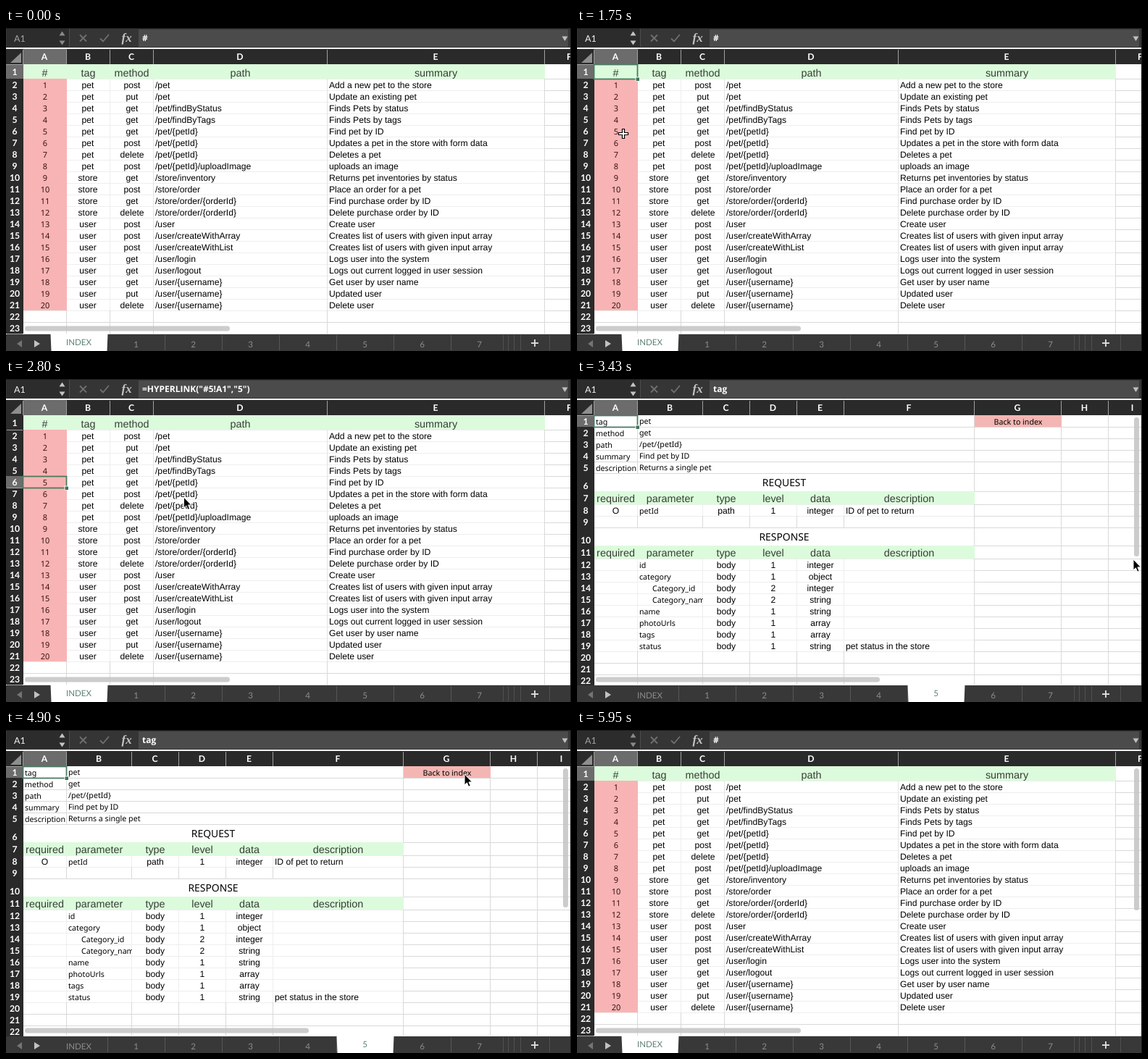
Write an HTML page that moves like this. It is 780x446 px and loops after 6.02 s.

```html
<!DOCTYPE html>
<html lang="en">
<head>
<meta charset="utf-8">
<title>Spreadsheet</title>
<style>
html, body { margin: 0; width: 100%; height: 100%; overflow: hidden; background: #fff; }
svg { display: block; }
text { text-rendering: geometricPrecision; white-space: pre; }
.cell { font: 12.15px "Liberation Sans", Arial, sans-serif; fill: #000; }
.head { font: 14.4px "Liberation Sans", Arial, sans-serif; fill: #354035; }
.note { font: 10.65px "Noto Sans", "Open Sans", sans-serif; fill: #000; }
.big { font: 13.9px "Noto Sans", "Open Sans", sans-serif; fill: #000; }
.idx { font: 11px "Noto Sans", "Open Sans", sans-serif; fill: #3c1212; }
.label { font: bold 12.2px Lato, sans-serif; fill: #fff; }
.formula { font: bold 12px "Open Sans", "Noto Sans", sans-serif; fill: #fff; }
.name { font: 12.5px Lato, sans-serif; fill: #f2f2f2; }
.tab { font: 11.6px Lato, sans-serif; fill: #8c8c8c; }
.tab.on { fill: #5f8272; }
.fresh .tab.on { fill: #a2aaa6; }
.fresh .tab.prev { fill: #5d9275; font-weight: bold; }
.fx { font: italic bold 17px "Liberation Serif", serif; fill: #c4c4c4; }
.step { fill: #c4c4c4; }
.idle .name { fill: #a4a4a4; }
.idle .step { fill: #8a8a8a; }
</style>
</head>
<body>
<svg id="stage" width="780" height="446" viewBox="0 0 780 446"></svg>
<script>
const GRID = '#d9d9d9', SOFT = '#eeeeee', GREEN = '#dcfbdc', PINK = '#f8b4b4', DARK = '#2a2a2a', RULE = '#a0a0a0';
const SIZE = { cell: 12.15, head: 14.4, note: 10.65, big: 13.9, idx: 11, label: 12.2, formula: 12, name: 12.5, tab: 11.6 };

const rect = (x, y, w, h, fill, more = '') =>
  `<rect x="${x}" y="${y}" width="${w}" height="${h}" fill="${fill}" ${more}/>`;
const vline = (x, y1, y2, c) => rect(x, y1, 1, y2 - y1, c);
const hline = (y, x1, x2, c) => rect(x1, y, x2 - x1, 1, c);
const shape = (d, fill, more = '') => `<path d="${d}" fill="${fill}" ${more}/>`;
const text = (x, mid, str, cls, anchor = 'start', more = '') =>
  `<text x="${x}" y="${mid + SIZE[cls.split(' ')[0]] * 0.35}" class="${cls}" text-anchor="${anchor}" ${more}>${str}</text>`;
const center = (a, b, mid, str, cls) => text((a + b) / 2, mid, str, cls, 'middle');
const group = (id, body) => `<g id="${id}">${body}</g>`;

// Row boundaries from a list of heights
const stack = (start, heights) => heights.reduce((a, h) => [...a, a[a.length - 1] + h], [start]);

function colHead(cols, i) {
  const a = cols[i], b = cols[i + 1];
  return rect(a + 1, 29, b - a, 21, i ? DARK : '#6c6c6c') + vline(b, 30, 50, RULE) +
    center(a, b, 40, 'ABCDEFGHI'[i], 'label');
}
function rowHead(rows, i, on, drop = 0) {
  const y = rows[i], h = rows[i + 1] - y;
  return rect(0, y, 24, h, on ? '#6c6c6c' : DARK) + hline(y + h, 1, 23, RULE) +
    text(12, y + 1 + h / 2 + drop, i + 1, 'label', 'middle');
}
const corner = rect(0, 29, 24, 21, DARK) + shape('M21 34V48H6Z', '#8e8e8e') + vline(23, 30, 50, RULE) + hline(50, 0, 23, RULE);

function tabs(active, prev) {
  let s = rect(0, 423, 780, 23, '#383838') +
    shape('M22 431V441L15 436Z', '#747474') + shape('M39 431V441L47 436Z', '#c2c2c2');
  for (let i = 0; i < 8; i++) {
    const x = 61.5 + 79 * i, on = i === active;
    if (on) s += shape(`M${x} 422H${x + 79}L${x + 78} 446H${x + 1}Z`, '#fff');
    else s += vline(Math.round(x + 78), 424, 445, '#575757');
    s += text(x + 39, on ? 434 : 436.5, i || 'INDEX', `tab${on ? ' on' : i === prev ? ' prev' : ''}`, 'middle');
  }
  for (const x of [686, 693, 701, 710, 750]) s += vline(x, 424, 445, '#505050');
  return s + rect(725, 434.2, 10, 1.8, '#e4e4e4') + rect(729.1, 430, 1.8, 10, '#e4e4e4');
}
const scrollbar = (x, y, w, h, id) =>
  rect(x, y, w, h, '#c4c4c4', `rx="3.5" opacity=".85" ${id ? `id="${id}"` : ''}`);

const selection = (y, h) =>
  rect(23.5, y, 60, h, 'none', 'stroke="#4b7a61" stroke-width="1.8"') +
  rect(80.5, y + h - 3, 6, 6, '#fff') + rect(81.5, y + h - 2, 4.5, 4.5, '#3f7558');

function indexSheet() {
  const cols = [23, 83, 143, 203, 443, 743, 812];
  const rows = stack(50, [20, ...Array(22).fill(16)]);
  const data = `pet,post,/pet,Add a new pet to the store
pet,put,/pet,Update an existing pet
pet,get,/pet/findByStatus,Finds Pets by status
pet,get,/pet/findByTags,Finds Pets by tags
pet,get,/pet/{petId},Find pet by ID
pet,post,/pet/{petId},Updates a pet in the store with form data
pet,delete,/pet/{petId},Deletes a pet
pet,post,/pet/{petId}/uploadImage,uploads an image
store,get,/store/inventory,Returns pet inventories by status
store,post,/store/order,Place an order for a pet
store,get,/store/order/{orderId},Find purchase order by ID
store,delete,/store/order/{orderId},Delete purchase order by ID
user,post,/user,Create user
user,post,/user/createWithArray,Creates list of users with given input array
user,post,/user/createWithList,Creates list of users with given input array
user,get,/user/login,Logs user into the system
user,get,/user/logout,Logs out current logged in user session
user,get,/user/{username},Get user by user name
user,put,/user/{username},Updated user
user,delete,/user/{username},Delete user`.split('\n').map(r => r.split(','));

  let s = rect(0, 29, 780, 394, '#fff');
  for (const y of rows.slice(1)) s += hline(y, 24, 743, y > 391 ? GRID : SOFT) + hline(y, 743, 780, GRID);
  for (const x of cols.slice(1, 6)) {
    s += vline(x, 70, 390, x < 203 ? SOFT : '#e4e4e4') + vline(x, 390, 422, GRID);
  }
  s += vline(743, 50, 390, GRID) + rect(24, 50, 720, 20, GREEN) + rect(24, 70, 60, 320, PINK);
  ['#', 'tag', 'method', 'path', 'summary'].forEach((h, i) => s += center(cols[i], cols[i + 1] + 1, 62, h, 'head'));
  data.forEach(([tag, method, path, sum], i) => {
    const y = 79 + 16 * i;
    s += center(24, 84, y, i + 1, 'idx') + center(83, 143, y, tag, 'cell') + center(144, 204, y, method, 'cell') +
      text(206, y, path, 'cell') + text(446, y, sum, 'cell');
  });
  for (let i = 0; i < 6; i++) s += colHead(cols, i);
  for (let i = 0; i < 23; i++) s += rowHead(rows, i, i === 0);
  const pick = group('linkPick', rowHead(rows, 0, false) + rowHead(rows, 5, true) + selection(134.5, 16));
  return group('index', s + corner + group('homePick', selection(50.5, 20)) + pick +
    scrollbar(26, 411.5, 283, 7) + scrollbar(769, 53, 7, 196, 'vbar') + tabs(0, 5));
}

function detailSheet() {
  const cols = [23, 83, 173, 238, 303, 368, 548, 668, 733, 800];
  const rows = stack(50, [16, 16, 16, 16, 16, 25, 18, 16, 16, 25, 18, ...Array(11).fill(16)]);
  const heads = ['required', 'parameter', 'type', 'level', 'data', 'description'];
  const info = ['tag', 'pet', 'method', 'get', 'path', '/pet/{petId}', 'summary', 'Find pet by ID', 'description', 'Returns a single pet'];
  const fields = ['id,1,integer', 'category,1,object', 'Category_id,2,integer', 'Category_name,2,string',
    'name,1,string', 'photoUrls,1,array', 'tags,1,array', 'status,1,string'].map(r => r.split(','));
  const table = (y1, y2) => cols.slice(1, 6).map(x => vline(x, y1, y2, SOFT)).join('');

  let s = rect(0, 29, 780, 394, '#fff');
  rows.slice(1).forEach((y, i) => {
    const inner = i === 6 || i === 7 || (i > 9 && i < 19);
    s += hline(y, 24, 548, inner ? SOFT : GRID) + hline(y, 548, 780, GRID);
  });
  for (const x of cols.slice(1, 6)) s += vline(x, 189, 205, GRID) + vline(x, 376, 422, GRID);
  for (const x of cols.slice(6, 9)) s += vline(x, 50, 422, GRID);
  s += vline(83, 50, 130, GRID) + table(173, 189) + table(248, 376);

  info.forEach((v, i) => {
    const y = 59 + 16 * (i >> 1);
    s += i % 2 ? text(86, y - 0.7, v, 'note') : text(26, y + 0.3, v, 'note');
  });
  s += center(23, 549, 143, 'REQUEST', 'big') + center(23, 549, 218, 'RESPONSE', 'big');
  for (const [y, mid] of [[155, 165], [230, 240]]) {
    s += rect(24, y, 525, 18, GREEN);
    heads.forEach((h, i) => s += center(cols[i], cols[i + 1] + 1, mid, h, 'head'));
  }
  const values = (y, type, level, kind) => center(173, 239, y, type, 'cell') +
    center(238, 304, y, level, 'cell') + center(303, 369, y, kind, 'cell');
  s += center(23, 84, 182, 'O', 'cell') + text(86, 182, 'petId', 'note') +
    values(182, 'path', 1, 'integer') + text(371, 182, 'ID of pet to return', 'cell');
  fields.forEach(([name, level, kind], i) => {
    const y = 257 + 16 * i;
    s += text(level > 1 ? 104 : 86, y, name, 'note') + rect(174, y - 7, 63, 14, '#fff') + values(y, 'body', level, kind);
  });
  s += text(371, 369, 'pet status in the store', 'cell') +
    rect(549, 50, 120, 16, '#f4b6b3') + center(549, 669, 59, 'Back to index', 'note');

  for (let i = 0; i < 9; i++) s += colHead(cols, i);
  for (let i = 0; i < 22; i++) s += rowHead(rows, i, i === 0, i === 5 || i === 9 ? 4.5 : 0);
  return group('detail', s + corner + selection(50.5, 16) +
    scrollbar(26, 411.5, 392, 7) + scrollbar(769, 53, 7, 192) + tabs(5, 0));
}

function toolbar() {
  const steps = '<path class="step" d="M73.5 10.5H81.5L77.5 4.5ZM73.5 17.5H81.5L77.5 23.5Z"/>';
  return group('bar', rect(0, 0, 780, 27, '#353535') + rect(1, 1, 86, 25, '#2c2c2c') + rect(183, 2, 593, 24, '#4b4b4b') +
    hline(0, 0, 780, '#1c1c1c') + vline(87, 1, 26, '#4c4c4c') +
    rect(0, 27, 780, 2, '#f0f0f0') +
    text(11, 14.5, 'A1', 'name') + steps +
    shape('M102 9.5L111 18.5M111 9.5L102 18.5', 'none', 'stroke="#707070" stroke-width="1.8"') +
    shape('M130 14.5L134 18.5L142 9', 'none', 'stroke="#707070" stroke-width="1.8"') +
    '<text x="159.5" y="19" class="fx">fx</text>' +
    text(188, 14, '#', 'formula', 'start', 'id="formula"') +
    shape('M767.5 11.5H775.5L771.5 18Z', '#c0c0c0'));
}

const pointers =
  group('arrow', shape('M0 0V15L3.4 11.8L5.7 17.2L8.2 16.1L5.9 10.9H10.4Z', '#000', 'stroke="#fff"')) +
  group('cross', shape('M-1.5 -6.5H1.5V-1.5H6.5V1.5H1.5V6.5H-1.5V1.5H-6.5V-1.5H-1.5Z', '#fff', 'stroke="#000" stroke-width="1.2"'));

const $ = id => document.getElementById(id);
$('stage').innerHTML = indexSheet() + detailSheet() + toolbar() + vline(779, 0, 446, '#1c1c1c') + pointers;

const LOOP = 6020, STEP = 70;
const FOCUS = 490, PRESS = 2590, OPEN = 2870, BACK = 4970, BLUR = 5810;

// Pointer stops: time, x, y
const path = [
  [420, -12, 290], [980, 90, 245], [1750, 64, 146], [2240, 55, 140], [2380, 53, 138], [2730, 53, 138],
  [2940, 795, 235], [3360, 795, 255], [3430, 768, 249], [3990, 768, 161], [4340, 644, 68], [4620, 633, 61],
  [5040, 633, 61], [5320, 795, 120]
];
function pointerAt(t) {
  const i = path.findIndex(p => p[0] > t);
  if (i < 1) return [-50, -50];
  const [t0, x0, y0] = path[i - 1], [t1, x1, y1] = path[i];
  const u = (t - t0) / (t1 - t0), k = u * u * (3 - 2 * u);
  return [x0 + (x1 - x0) * k, y0 + (y1 - y0) * k];
}
const show = (id, on) => $(id).style.display = on ? '' : 'none';

function render(t) {
  const detail = t >= OPEN && t < BACK, active = t >= FOCUS && t < BLUR;
  const link = t >= PRESS && t < OPEN;
  show('index', !detail);
  show('detail', detail);
  show('homePick', active && !link);
  show('linkPick', link);
  $('bar').classList.toggle('idle', !active);
  $('formula').textContent = detail ? 'tag' : link ? '=HYPERLINK("#5!A1","5")' : '#';
  $('detail').classList.toggle('fresh', t < OPEN + 140);
  $('index').classList.toggle('fresh', t >= BACK && t < BACK + 140);
  $('vbar').style.opacity = t < BACK ? 0 : Math.min(1, (t - BACK) / 420) * 0.85;

  const [x, y] = pointerAt(t);
  const arrow = x > 766 || (t >= PRESS && t < OPEN + 70) || (t >= 4760 && t < BACK);
  show('arrow', arrow);
  show('cross', !arrow);
  $(arrow ? 'arrow' : 'cross').setAttribute('transform', `translate(${x.toFixed(1)} ${y.toFixed(1)})`);
}

const start = performance.now();
function tick() {
  const t = (performance.now() - start) % LOOP;
  render(Math.floor(t / STEP) * STEP);
  requestAnimationFrame(tick);
}
tick();
</script>
</body>
</html>
```
